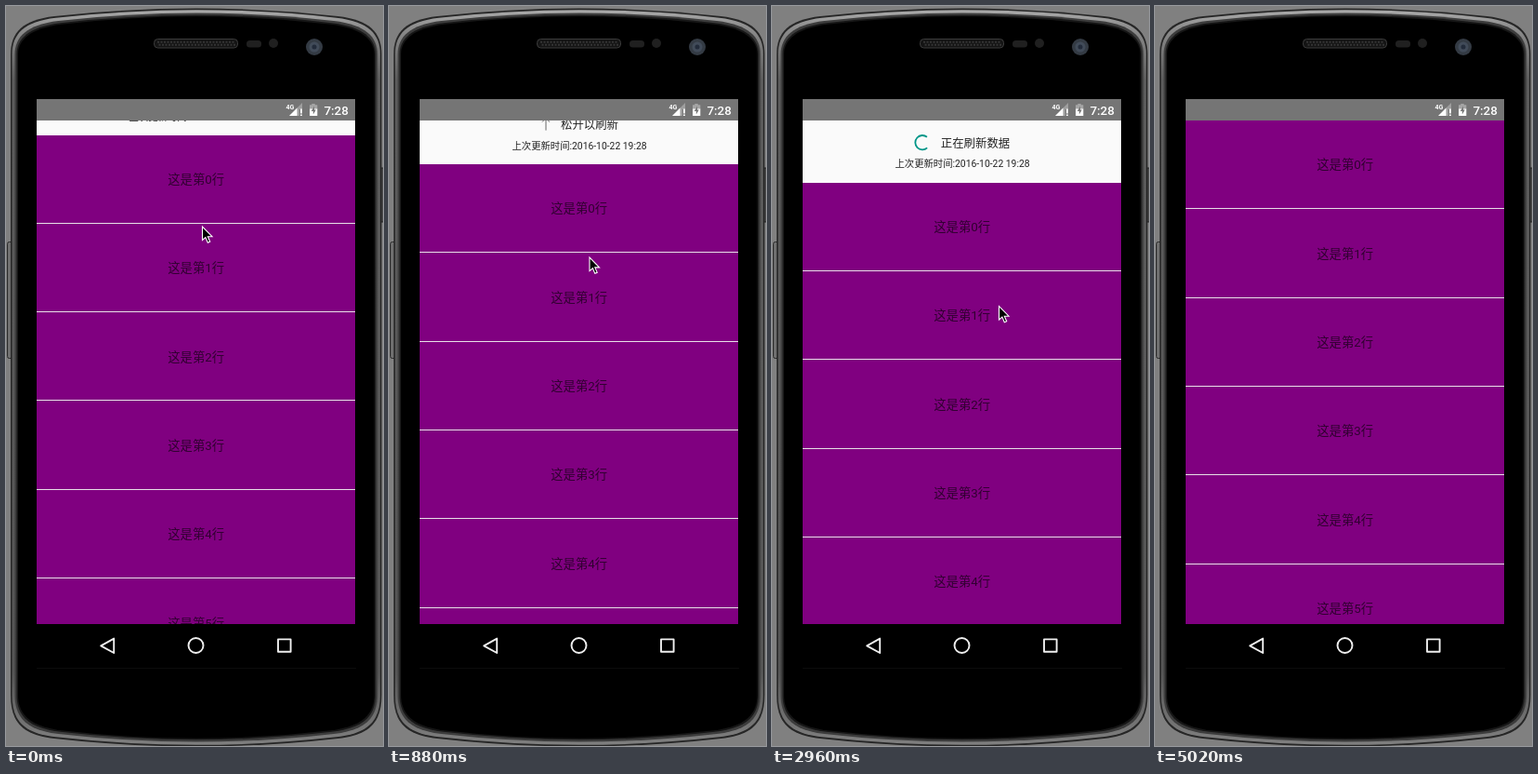
An HTML page for the animation above (6.52 s loop, 406 px wide and 795 px high).

```html
<!DOCTYPE html>
<html lang="zh-CN">
<head>
<meta charset="utf-8">
<title>下拉刷新</title>
<style>
  html, body { margin: 0; height: 100%; overflow: hidden; background: #808080; }
  svg { display: block; width: 100%; height: 100%; }
  text { font-family: Roboto, "Noto Sans CJK SC", "Noto Sans CJK", sans-serif; text-anchor: middle; }
  #list rect { shape-rendering: crispEdges; }
  .row { font-size: 13.35px; fill: #300030; }
  .title { font-size: 12.4px; fill: #222; }
  .sub { font-size: 10.35px; fill: #222; }
</style>
</head>
<body>
<svg viewBox="0 0 406 795">
  <defs>
    <linearGradient id="rim" gradientUnits="userSpaceOnUse" x1="0" y1="0" x2="0" y2="795">
      <stop offset="0" stop-color="#b0b0b0"/>
      <stop offset=".03" stop-color="#8c8c8c"/>
      <stop offset=".1" stop-color="#5c5c5c"/>
      <stop offset=".9" stop-color="#555"/>
      <stop offset="1" stop-color="#808080"/>
    </linearGradient>
    <clipPath id="view"><rect x="33" y="123" width="343" height="541"/></clipPath>
  </defs>

  <!-- Phone -->
  <rect x="1.5" y="253.5" width="6" height="125" rx="2" fill="#707070" stroke="#2a2a2a"/>
  <rect x="402" y="174" width="6" height="58" rx="2" fill="#444" stroke="#1c1c1c"/>
  <g id="body"></g>
  <rect x="159.5" y="35.5" width="90" height="9.5" rx="4" fill="#141414" stroke="#3c3c3c"/>
  <path d="M163 38.7H247M164.5 41.7H247" stroke="#343434" stroke-width="2" stroke-dasharray="2 1.5"/>
  <rect x="259" y="37" width="16" height="7.5" rx="3.5" fill="#202020"/>
  <circle cx="288" cy="40" r="5" fill="#202020"/>
  <circle cx="332" cy="44" r="9" fill="#343b44"/>
  <circle cx="332" cy="44" r="5.5" fill="#414b59"/>
  <circle cx="332" cy="44" r="2.5" fill="#222b3a"/>

  <!-- List and its pull-down header -->
  <g clip-path="url(#view)">
    <rect x="33" y="123" width="343" height="541" fill="#fafafa"/>
    <g id="list">
      <rect x="33" width="343" height="600" fill="#800080"/>
      <g id="pull">
        <path d="M169 -49.5V-36.5M165 -45.5L169 -49.5L173 -45.5" fill="none" stroke="#666"/>
        <text class="title" x="216" y="-38.2">松开以刷新</text>
      </g>
      <g id="busy">
        <path id="arc" fill="none" stroke="#009688" stroke-width="1.8"/>
        <text class="title" x="219" y="-38.2">正在刷新数据</text>
      </g>
      <text id="sub" class="sub" x="205">上次更新时间:2016-10-22 19:28</text>
    </g>
  </g>

  <!-- Status bar -->
  <rect x="33" y="100" width="343" height="23" fill="#757575"/>
  <g fill="#fff">
    <text x="306" y="111" font-size="7" font-weight="700">4G</text>
    <path d="M305 118L319 104V111H316V118Z" opacity=".3"/>
    <path d="M305 118L313.5 109.5V118ZM317 110.5H318.8V115.5H317ZM317 116.4H318.8V118H317Z"/>
    <path d="M327 106.2H329.3V105H332.7V106.2H335.3V111H327Z" opacity=".35"/>
    <path d="M327 110.5H335.3V118H327Z"/>
    <path d="M332 107.5L328.8 113H330.8V116.5L333.8 111.5H332Z" fill="#757575"/>
    <text x="355.6" y="116.5" font-size="13.4" font-weight="500">7:28</text>
  </g>

  <!-- Navigation bar -->
  <rect x="33" y="664" width="343" height="47" fill="#000"/>
  <path d="M33 711.5H377" stroke="#0c0c0c"/>
  <g fill="none" stroke="#eee" stroke-width="1.9" stroke-linejoin="round">
    <path d="M102.2 687.3L116.2 679.6V695Z"/>
    <circle cx="204.5" cy="687" r="8"/>
    <rect x="293" y="680.4" width="13.6" height="13.4"/>
  </g>

  <path id="cursor" d="M0 0V14.5L3.4 11.6L5.8 17.2L8.2 16.2L5.8 10.7H10.5Z" stroke="#fff" stroke-width="1.1"/>
</svg>
<script>
const LOOP = 6520, TICK = 147.6, TOP = 123, OPEN = 66.7, ROW = 95.33;
const $ = id => document.getElementById(id);
const clamp = v => Math.min(1, Math.max(0, v));
const ease = v => (v = clamp(v), v * v * (3 - 2 * v));
const show = (id, on) => $(id).setAttribute('visibility', on ? 'visible' : 'hidden');
const move = (id, x, y) => $(id).setAttribute('transform', `translate(${x} ${y})`);
const add = (id, markup) => $(id).insertAdjacentHTML('beforeend', markup);

// Phone outline, inset by d
function outline(d) {
  const l = 5 + d, r = 404.5 - d, a = l + 47, b = r - 47;
  const top = 11 + d * 1.1, low = 787 - d * 1.1;
  return `M${l} 52C${l} ${top + 17} ${l + 13} ${top + 4} ${a} ${top}Q205 ${top - 17} ${b} ${top}` +
    `C${r - 13} ${top + 4} ${r} ${top + 17} ${r} 52V740C${r} ${low - 17} ${r - 13} ${low - 4} ${b} ${low}` +
    `Q205 ${low + 17} ${a} ${low}C${l + 13} ${low - 4} ${l} ${low - 17} ${l} 740Z`;
}
const layers = [[0, '#262626'], [1.5, 'url(#rim)'], [4.5, '#3c3c3c'], [6.5, '#161616'], [8, '#000']];
for (const [d, fill] of layers) add('body', `<path d="${outline(d)}" fill="${fill}"/>`);

for (let i = 0; i < 6; i++) {
  const y = i * ROW;
  add('list', `<text class="row" x="204.7" y="${y + 52.4}">这是第${i}行</text>
    <rect x="33" y="${y + 94.3}" width="343" height="1" fill="#e8e0e8"/>`);
}

// Pointer path after the drag: tick, x, y
const path = [
  [8, 217.5, 291], [12, 217.5, 306], [14, 217.5, 306], [15, 232.5, 313.5], [20, 244.5, 322.5],
  [28, 244.5, 322.5], [29, 251, 352], [30, 270.5, 440.5], [32, 270.5, 440.5], [33, 320.5, 753]
];

const drag = n => 1.85 * n + 0.569 * n * n;

function pointer(n) {
  if (n < 8) return [211.5 + n * 0.75, 237 + drag(n) * 1.05];
  const i = Math.max(1, path.findIndex(p => p[0] >= n));
  const [a, b] = [path[i - 1], path[i]];
  const k = (n - a[0]) / (b[0] - a[0]);
  return [1, 2].map(j => a[j] + (b[j] - a[j]) * k);
}

function listTop(n) {
  if (n < 8) return TOP + 15.5 + drag(n);
  return TOP + OPEN * (1 - clamp((n - 22) / 5)) ** 1.75;
}

// Indeterminate ring: the head grows, then the tail catches up, while it all turns
function ring(u) {
  const turn = u * 234 - 90, cycle = u % 1;
  const from = turn + 270 * ease(cycle * 2 - 1), to = turn + 270 * ease(cycle * 2);
  const at = deg => {
    const r = deg * Math.PI / 180;
    return `${162 + 7.7 * Math.cos(r)} ${-43 + 7.7 * Math.sin(r)}`;
  };
  return to - from < 1 ? '' : `M${at(from)}A7.7 7.7 0 ${to - from > 180 ? 1 : 0} 1 ${at(to)}`;
}

function draw(now) {
  // The screen refreshes in even ticks
  const n = Math.floor((now % LOOP + 12) / TICK);
  const busy = n >= 15;
  move('list', 0, listTop(n));
  show('pull', !busy);
  show('busy', busy);
  $('sub').setAttribute('y', busy ? -17.2 : -15.8);
  $('arc').setAttribute('d', busy ? ring((n - 15) * TICK / 1333) : '');
  show('cursor', n <= 33);
  if (n <= 33) move('cursor', ...pointer(n));
}

const start = performance.now();
function loop() {
  draw(performance.now() - start);
  requestAnimationFrame(loop);
}
loop();
</script>
</body>
</html>
```
